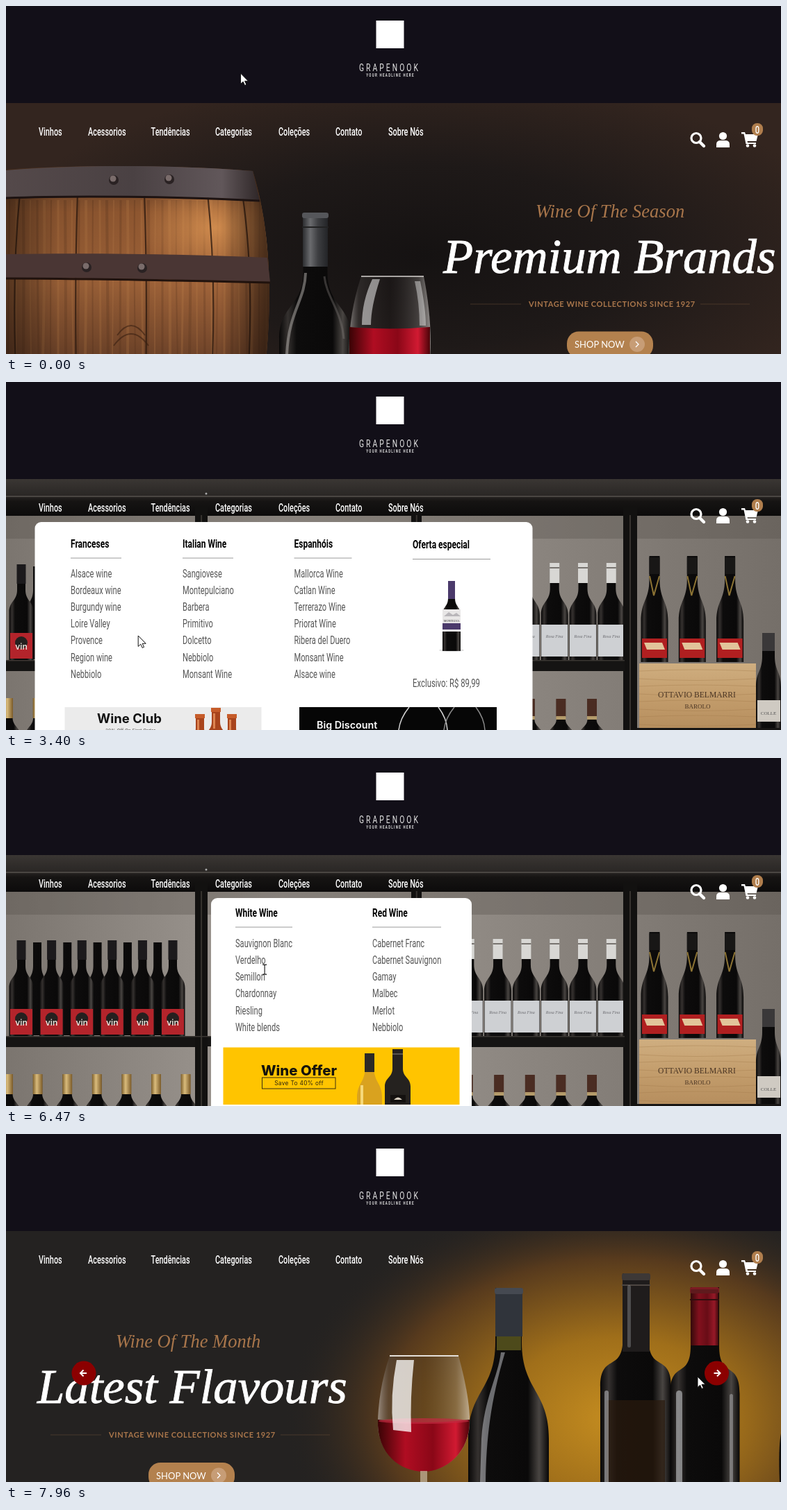
Animation, 1115 px wide and 502 px high, one loop 8 s. Source, as an HTML page:

```html
<!DOCTYPE html>
<html lang="pt">
<head>
<meta charset="utf-8">
<title>Wine shop</title>
<style>
  html, body { margin: 0; width: 100%; height: 100%; overflow: hidden; background: #120f18; }
  svg { display: block; width: 1115px; height: 502px; }
  .ui { font-family: Roboto, "Liberation Sans", sans-serif; }
  .serif { font-family: "Liberation Serif", "Noto Serif", serif; }
  .lato { font-family: Lato, "Open Sans", sans-serif; }
  .inter { font-family: Inter, "Open Sans", sans-serif; }
</style>
</head>
<body>
<svg id="stage" viewBox="0 0 1115 502" xmlns="http://www.w3.org/2000/svg"></svg>
<script>
const W = 1115, LOOP = 8000;
const stage = document.getElementById('stage');

// Markup helpers
const rect = (x, y, w, h, fill, more = '') =>
  `<rect x="${x}" y="${y}" width="${w}" height="${h}" fill="${fill}" ${more}/>`;
const path = (d, fill, more = '') => `<path d="${d}" fill="${fill}" ${more}/>`;
const stroke = (d, color, width, more = '') =>
  path(d, 'none', `stroke="${color}" stroke-width="${width}" ${more}`);
const circle = (x, y, r, fill, more = '') => `<circle cx="${x}" cy="${y}" r="${r}" fill="${fill}" ${more}/>`;
const text = (x, y, s, size, fill, cls, more = '') =>
  `<text x="${x}" y="${y}" font-size="${size}" fill="${fill}" class="${cls}" ${more}>${s}</text>`;
const narrow = (x, y, s, size, fill, more = '', k = .69) =>
  `<text transform="translate(${x} ${y}) scale(${k} 1)" font-size="${size}" fill="${fill}" class="ui" ${more}>${s}</text>`;
const row = (n, x, step, draw) => Array.from({ length: n }, (_, i) => draw(x + i * step, i)).join('');
const stops = list => list.map(([o, c, a = 1]) =>
  `<stop offset="${o}" stop-color="${c}" stop-opacity="${a}"/>`).join('');
const linear = (id, list, vertical) =>
  `<linearGradient id="${id}" x2="${vertical ? 0 : 1}" y2="${vertical ? 1 : 0}">${stops(list)}</linearGradient>`;
const radial = (id, x, y, rx, ry, list) =>
  `<radialGradient id="${id}" gradientUnits="userSpaceOnUse" cx="0" cy="0" r="1" gradientTransform="translate(${x} ${y}) scale(${rx} ${ry})">${stops(list)}</radialGradient>`;

// A bottle: n = half neck, b = half body, s1..s2 = shoulder, round = how square the shoulder is
const bottle = (x, top, end, n, b, s1, s2, fill = 'url(#dark)', round = .5) => {
  const low = s1 + (s2 - s1) * round, high = s2 - (s2 - s1) * round;
  return path(`M${x - n} ${top}H${x + n}V${s1}C${x + n} ${low} ${x + b} ${high} ${x + b} ${s2}V${end}` +
    `H${x - b}V${s2}C${x - b} ${high} ${x - n} ${low} ${x - n} ${s1}Z`, fill);
};

const defs = `<defs>
  ${linear('dark', [[0, '#080707'], [.12, '#35312f'], [.24, '#0d0c0c'], [.74, '#0a0909'], [.88, '#494542'], [1, '#080707']])}
  ${linear('olive', [[0, '#12120d'], [.2, '#3d3b2c'], [.5, '#16150f'], [.85, '#35321f'], [1, '#0c0b08']])}
  ${linear('red', [[0, '#8f1420'], [.4, '#e0394a'], [1, '#8a1019']])}
  ${linear('wineRed', [[0, '#3a0305'], [.3, '#b00d22'], [.6, '#8a0717'], [.85, '#d11a32'], [1, '#4a0308']])}
  ${linear('gold', [[0, '#7d5f2b'], [.4, '#d9bb7c'], [1, '#7a5a28']])}
  ${linear('steel', [[0, '#2c2d30'], [.3, '#6a6b6e'], [.6, '#3e3f42'], [1, '#232427']])}
  ${linear('wood', [[0, '#5d3b24'], [.25, '#945a32'], [.6, '#a2653a'], [1, '#6b4128']], true)}
  ${linear('hoop', [[0, '#54494a'], [.5, '#4a4143'], [.85, '#61575a'], [1, '#2f2728']])}
  ${linear('edge', [[0, '#160d08', .55], [.2, '#160d08', .1], [.8, '#160d08', 0], [1, '#160d08', .75]])}
  ${linear('wall', [[0, '#7b756f'], [.35, '#a19b95'], [1, '#756f69']])}
  ${linear('beam', [[0, '#3a3633'], [.45, '#2a2725'], [.6, '#161413'], [1, '#0c0b0b']], true)}
  ${linear('crate', [[0, '#cfae80'], [.5, '#c39d6c'], [1, '#b68e5e']], true)}
  ${linear('clear', [[0, '#d9d5d2', .55], [.12, '#6b6663', .25], [.5, '#2a2524', .15], [.85, '#8f8a87', .35], [1, '#e2dedb', .6]])}
  ${radial('room', 600, 360, 620, 260, [[0, '#151212'], [.5, '#1e1918'], [1, '#33251f']])}
  ${radial('warm', 300, 320, 110, 70, [[0, '#e29a56', .75], [1, '#e29a56', 0]])}
  ${radial('glow', 880, 410, 480, 330, [[0, '#c58d20'], [.35, '#a06f1a'], [.7, '#573a1d'], [1, '#242221', 0]])}
  <clipPath id="cask"><path d="M0 236C110 228 260 230 355 238C374 300 386 390 374 510H0Z"/></clipPath>
</defs>`;

function heroText(x, y, script, title, titleX, tag, tagX, tagY, btnX, btnY) {
  const tan = '#a9764b', spaced = 'font-weight="700" letter-spacing=".62"';
  const rule = (a, b) => stroke(`M${a} ${tagY - 4}H${b}`, '#6b4c36', 1, 'opacity=".5"');
  return text(x, y, script, 26.5, tan, 'serif', 'font-style="italic"') +
    text(titleX, y + 80, title, 70.7, '#fff', 'serif', 'font-style="italic" stroke="#fff" stroke-width=".9"') +
    text(tagX, tagY, tag, 11, tan, 'lato', spaced) +
    rule(tagX - 84, tagX - 11) + rule(tagX + 247, tagX + 318) +
    rect(btnX, btnY, 124, 38, '#b3814e', 'rx="17"') +
    text(btnX + 11, btnY + 23.5, 'SHOP NOW', 13, '#fff', 'lato') +
    circle(btnX + 101, btnY + 18.5, 11, '#c79d76') +
    stroke(`M${btnX + 99} ${btnY + 14.5}l4 4l-4 4`, '#fff', 1.3);
}

const TAG = 'VINTAGE WINE COLLECTIONS SINCE 1927';

function barrelSlide() {
  const seams = [20, 103, 199, 290, 340].map(x => {
    const lean = (x - 150) / 12;
    return stroke(`M${x} 270Q${x + lean} 380 ${x + lean * .6} 510`, '#2f1b10', 2.2, 'opacity=".8"');
  }).join('');
  const grain = row(38, 5, 10, (x, i) =>
    stroke(`M${x} 280q${i % 3 - 1} 110 ${i % 5 - 2} 225`, i % 2 ? '#c98a50' : '#4a2b18', 2 + i % 3, 'opacity=".22"'));
  const rivets = [[155, 250], [235, 249], [116, 376], [196, 377]].map(([x, y]) =>
    circle(x, y + 1, 7, '#2a2223') + circle(x - 1, y - 1, 4.5, '#7a6c6b')).join('');
  const glass = 'M511 390C498 430 492 470 494 510H610C613 470 608 425 601 390Z';
  return rect(0, 140, W, 362, 'url(#room)') +
    `<g clip-path="url(#cask)">${rect(0, 225, 390, 290, 'url(#wood)')}${grain}${rect(180, 240, 210, 160, 'url(#warm)')}${seams}` +
    stroke('M160 475q20 -28 40 0M155 490q25 -34 50 0', '#3b2112', 2, 'opacity=".6"') +
    rect(0, 225, 385, 290, 'url(#edge)') + '</g>' +
    path('M0 237C110 228 260 230 355 238L365 280C250 274 100 272 0 276Z', 'url(#hoop)') +
    stroke('M0 277C100 273 250 275 365 281', '#1d1312', 3) +
    path('M0 358C120 356 260 358 376 363L380 398C250 395 120 392 0 392Z', '#4a3634') +
    stroke('M0 393C120 393 250 396 380 399', '#20120d', 3) + rivets +
    bottle(445, 298, 510, 17.5, 52, 385, 480) +
    rect(427, 300, 36, 76, 'url(#steel)') + rect(426, 298, 38, 8, '#55565a', 'rx="3"') + rect(426, 318, 38, 2, '#222') +
    stroke('M431 385C430 425 407 440 404 502', '#b9b5b2', 4, 'opacity=".5"') +
    stroke('M458 390C461 420 483 440 486 480', '#7c7774', 3, 'opacity=".4"') +
    path(glass, 'url(#clear)') +
    path('M494 463Q552 468 610 463V510H494Z', 'url(#wineRed)') +
    path('M527 394h11q-13 40 -13 66h-13q0 -34 15 -66', '#fff', 'opacity=".5"') +
    path('M588 397h8q8 40 8 64h-9q0 -32 -7 -64', '#fff', 'opacity=".4"') +
    stroke('M511 390H601', '#d9d5d2', 1.6) +
    heroText(762, 305, 'Wine Of The Season', 'Premium Brands', 629, TAG, 752, 434, 807, 469.5);
}

function shelfSlide() {
  const post = (x, w) => rect(x, 180, w, 322, '#121110') + rect(x + w * .45, 192, 2, 310, '#37332f');
  const redLabel = x => bottle(x, 263, 402, 6, 17.5, 300, 332) + rect(x - 6.5, 263, 13, 28, '#1c1a1c') +
    rect(x - 16, 362, 32, 37, '#b3242b') + circle(x, 376, 9, '#25201f') +
    text(x, 386, 'vin', 12, '#e8dfd8', 'inter', 'text-anchor="middle" font-weight="600"');
  const whiteLabel = x => bottle(x, 263, 400, 6.5, 19.5, 300, 340, 'url(#olive)') + rect(x - 7, 262, 14, 31, 'url(#red)') +
    rect(x - 19, 358, 38, 41, '#dcd8d0') + circle(x - 5, 374, 7, '#b9b4ac') + rect(x - 11, 388, 22, 1, '#a39d95');
  const whiteCap = x => bottle(x, 262, 401, 6.5, 19.5, 298, 336) + rect(x - 7, 261, 14, 29, '#d8d7d4') +
    rect(x - 7, 267, 14, 2, '#77736f') + rect(x - 19, 350, 38, 46, '#ced0d3') +
    text(x, 369, 'Rosa Fina', 6, '#6d6d72', 'serif', 'text-anchor="middle" font-style="italic"');
  const sparkling = x => bottle(x, 251, 404, 7.5, 19.5, 285, 345) + rect(x - 7.5, 253, 15, 24, '#181716') +
    stroke(`M${x - 7} 280l6 28l8 -28`, '#8d7434', 2) +
    rect(x - 18, 370, 36, 28, '#b01f20') + path(`M${x - 15} 376h26l4 10h-26z`, '#e2c49a');
  const striped = x => bottle(x, 444, 510, 7, 20, 470, 500) +
    row(5, 444, 7, y => rect(x - 7, y, 14, 3.5, '#eee'));
  return rect(0, 140, W, 362, 'url(#wall)') +
    rect(0, 192, W, 34, '#56514c', 'opacity=".35"') +
    rect(0, 140, W, 53, 'url(#beam)') + rect(0, 164, W, 2, '#4a4642') + circle(288, 161, 1.5, '#aaa') +
    row(5, 45, 43.3, x => bottle(x, 266, 400, 6, 16, 300, 335)) + row(6, 22, 43.6, redLabel) +
    row(5, 347, 48.5, x => bottle(x, 267, 400, 6.5, 18, 300, 340, 'url(#olive)') + rect(x - 7, 266, 14, 28, 'url(#red)')) +
    row(6, 326, 47.2, whiteLabel) + row(7, 626, 40.8, whiteCap) +
    row(7, 3, 42.6, x => bottle(x, 457, 510, 6.5, 17, 484, 510) + rect(x - 7, 456, 14, 29, 'url(#gold)')) +
    row(3, 444, 38.5, striped) +
    row(6, 620, 44.6, x => bottle(x, 458, 510, 6.5, 18, 486, 510) + rect(x - 7, 457, 14, 26, '#4a2c22') + rect(x - 7, 482, 14, 5, '#b39a6a')) +
    post(272, 18) + post(583, 15) + post(888, 20) +
    rect(0, 402, 272, 15, '#151413') + rect(290, 401, 294, 15, '#151413') + rect(598, 402, 292, 15, '#151413') +
    rect(0, 401, 890, 1.5, '#3b3733') +
    row(3, 933, 54.3, sparkling) +
    rect(911, 406, 168, 94, 'url(#crate)') +
    row(8, 417, 11, (y, i) => stroke(`M911 ${y}q80 ${i % 2 ? 5 : -4} 168 0`, '#a37b4d', 1, 'opacity=".4"')) +
    text(994, 455, 'OTTAVIO BELMARRI', 11.6, '#4a3524', 'serif', 'text-anchor="middle"') +
    text(995, 471, 'BAROLO', 9, '#4a3524', 'serif', 'text-anchor="middle"') +
    bottle(1097, 362, 502, 9, 18, 395, 440) + rect(1088, 362, 18, 26, '#3a3839') +
    rect(1081, 459, 33, 31, '#cfcac2') + text(1097, 480, 'COLLE', 7, '#555', 'serif', 'text-anchor="middle"') +
    rect(908, 499, 207, 3, '#171514');
}

function flavourSlide() {
  const shine = (x, y, w, h, a) => rect(x, y, w, h, '#dfe3e8', `rx="${w / 2}" opacity="${a}"`);
  return rect(0, 140, W, 362, '#242221') + rect(390, 140, 725, 362, 'url(#glow)') +
    bottle(723, 222, 510, 19, 58, 300, 440) + rect(704, 224, 39, 68, '#30343b') +
    rect(703, 222, 41, 9, '#454951', 'rx="3"') + rect(706, 292, 35, 20, '#4d4a1b') +
    path('M712 315C708 350 688 380 684 440L682 502H690C691 440 697 385 718 315Z', '#dfe3e8', 'opacity=".45"') +
    bottle(906, 201, 510, 18.5, 51, 295, 365, 'url(#dark)', .72) + rect(887, 202, 39, 112, '#1f1c1c') +
    rect(886, 201, 41, 10, '#3d3836', 'rx="3"') + rect(886, 217, 41, 2, '#4d4642') +
    rect(864, 384, 84, 118, '#2a1a0d', 'opacity=".7"') + shine(861, 370, 6, 140, .45) + shine(894, 218, 5, 90, .25) +
    bottle(1005.5, 221, 510, 20.5, 50, 305, 375, 'url(#dark)', .72) + rect(985, 224, 40, 81, 'url(#wineRed)') +
    rect(984, 221, 42, 9, '#7c1b22', 'rx="3"') + rect(984, 238, 42, 2, '#35070b') + rect(985, 224, 40, 81, '#2a1716', 'opacity=".35"') +
    shine(964, 370, 9, 140, .5) + shine(1041, 375, 5, 130, .35) +
    path('M1115 432q-4 20 -2 70h2z', '#0d0b0a') +
    path('M552 320H651C662 360 668 395 667 420C664 462 632 487 601 487C568 487 536 460 535 420C535 390 540 355 552 320Z', 'url(#clear)') +
    path('M535 412Q601 420 667 412C668 460 632 487 601 487C568 487 533 462 535 412Z', 'url(#wineRed)') +
    `<ellipse cx="601" cy="414" rx="65" ry="4" fill="#c22a40" opacity=".7"/>` +
    path('M562 326h25q-6 55 -4 104l-26 -3q-5 -50 5 -101', '#fff', 'opacity=".75"') +
    rect(596, 486, 10, 20, '#c9b9a0', 'opacity=".7"') +
    stroke('M552 320H651', '#e5e0da', 1.8) +
    heroText(158, 308, 'Wine Of The Month', 'Latest Flavours', 45, TAG, 148, 438, 205, 474);
}

const slides = [barrelSlide(), shelfSlide(), flavourSlide()]
  .map((s, i) => `<svg x="${i * W}" y="0" width="${W}" height="502">${s}</svg>`).join('');

// Drop-down menus
const links = [];
function column(menu, x, y, lineW, title, first, step, items) {
  return narrow(x, y, title, 16, '#000', 'font-weight="700"', .75) +
    rect(x, y + 15, lineW, 1, '#9a9a9a') +
    items.map((s, i) => {
      const ly = first + i * step;
      links.push({ menu, x, y: ly - 5, w: lineW });
      return narrow(x, ly, s, 16, '#555', 'data-link=""', .695);
    }).join('');
}

const countries = rect(41.5, 202, 716, 330, '#fff', 'rx="9"') +
  column(0, 93, 238.5, 73, 'Franceses', 282, 24.1, ['Alsace wine', 'Bordeaux wine', 'Burgundy wine', 'Loire Valley', 'Provence', 'Region wine', 'Nebbiolo']) +
  column(0, 254, 238.5, 73, 'Italian Wine', 282, 24.1, ['Sangiovese', 'Montepulciano', 'Barbera', 'Primitivo', 'Dolcetto', 'Nebbiolo', 'Monsant Wine']) +
  column(0, 414.5, 238.5, 83, 'Espanhóis', 282, 24.1, ['Mallorca Wine', 'Catlan Wine', 'Terrerazo Wine', 'Priorat Wine', 'Ribera del Duero', 'Monsant Wine', 'Alsace wine']) +
  column(0, 585, 240, 112, 'Oferta especial', 0, 0, []) +
  narrow(585, 440, 'Exclusivo: R$ 89,99', 16, '#555', '', .71) +
  `<ellipse cx="641" cy="387" rx="18" ry="2" fill="#ddd"/>` +
  bottle(641, 287, 388, 5, 13, 312, 336) + rect(636, 287, 10, 26, '#4b3a6b') +
  rect(628, 328, 26, 32, '#e8e6e6') + path('M630 338l7 -6l6 4l5 -3l6 5z', '#b9b6ba') +
  text(641, 346, 'MONTELVA', 4.2, '#333', 'serif', 'text-anchor="middle"') + rect(628, 348, 26, 9, '#4b3a6b') +
  rect(84.5, 469, 283, 40, '#ebebeb') +
  text(131, 491.5, 'Wine Club', 18.5, '#111', 'inter', 'font-weight="700"') +
  text(143, 505, '20% Off On First Order', 6.6, '#555', 'inter') +
  [[279, 479], [325, 479], [302, 470]].map(([x, y]) =>
    bottle(x, y, 510, 6, 15, y + 20, y + 45, '#a8441c') + rect(x - 7, y, 14, 6, '#c65c2a') + rect(x - 4, y + 8, 3, 22, '#dd8450')).join('') +
  rect(422, 469, 284, 40, '#060606') +
  text(447, 500, 'Big Discount', 14.3, '#fff', 'inter', 'font-weight="600"') +
  stroke('M580 469Q567 485 565 502M622 469Q634 485 635 502', '#d5d5d5', 1.5) +
  stroke('M645 469Q632 485 630 502M676 469Q688 485 689 502', '#8a8a8a', 1.5);

const types = rect(295, 202, 375, 330, '#fff', 'rx="9"') +
  column(1, 330, 228.5, 82, 'White Wine', 272.5, 24.3, ['Sauvignon Blanc', 'Verdelho', 'Semillon', 'Chardonnay', 'Riesling', 'White blends']) +
  column(1, 527, 228.5, 99, 'Red Wine', 272.5, 24.3, ['Cabernet Franc', 'Cabernet Sauvignon', 'Gamay', 'Malbec', 'Merlot', 'Nebbiolo']) +
  rect(312.5, 417.5, 340, 82.5, '#ffc400') +
  text(367, 458, 'Wine Offer', 20.4, '#15130c', 'inter', 'font-weight="800"') +
  rect(368.5, 461, 105.5, 16, 'none', 'stroke="#3a3010"') +
  text(421.5, 472, 'Save To 40% off', 8.3, '#2a240e', 'inter', 'text-anchor="middle" letter-spacing=".35"') +
  bottle(523, 426, 500, 6.5, 18, 447, 490, '#d9a21f') + rect(516, 426, 14, 27, '#2c2a26') + rect(510, 472, 4, 28, '#f6d879') +
  bottle(563.5, 420, 500, 7.5, 18.5, 448, 474, '#25221f') + rect(556, 426, 15, 2, '#5a5550') +
  rect(553, 486, 22, 11, '#14110f') + path('M558 493q6 -7 12 0z', '#d8cfc0');

const nav = [[47, 'Vinhos'], [118, 'Acessorios'], [208.5, 'Tendências'], [301, 'Categorias'], [392, 'Coleções'], [474, 'Contato'], [550, 'Sobre Nós']]
  .map(([x, s]) => narrow(x, 187, s, 16, '#fff', 'font-weight="500"', .68)).join('');

const header = rect(0, 0, W, 139.5, '#120f18') +
  rect(532.5, 21, 40, 40, '#fff') +
  narrow(552, 94, 'GRAPENOOK', 15, '#e6e6e6', 'text-anchor="middle" letter-spacing="4.4"') +
  narrow(553, 102, 'YOUR HEADLINE HERE', 6.5, '#ddd', 'text-anchor="middle" letter-spacing="1.9" font-weight="700"');

const icons = stroke('M998 196L1004 202', '#fff', 4.4, 'stroke-linecap="round"') +
  circle(993, 190.5, 7, 'none', 'stroke="#fff" stroke-width="3.2"') +
  circle(1031.5, 187.5, 5.6, '#fff') +
  path('M1022 204V199.5Q1022 194 1028 194H1035Q1041 194 1041 199.5V204Z', '#fff') +
  path('M1058 182H1063L1064 185H1082L1079.5 195H1066.5L1067 197H1079V199H1064.5L1061.5 184.5H1058Z', '#fff') +
  circle(1067, 201.5, 2.3, '#fff') + circle(1077, 201.5, 2.3, '#fff') +
  rect(1073, 169, 16, 18, '#b07e4d', 'rx="7.5"') +
  narrow(1081, 183.5, '0', 14, '#fff', 'text-anchor="middle" font-weight="500"', .8);

const arrow = (x, dir) => circle(x, 345, 17.5, '#8b0000') +
  stroke(`M${x - 4 * dir} 345h${8.5 * dir}M${x + .5 * dir} 340.5l${4.5 * dir} 4.5l${-4.5 * dir} 4.5`, '#fff', 2);

stage.innerHTML = defs + `<g id="strip">${slides}</g>` + header + nav + icons +
  `<g id="menu0">${countries}</g><g id="menu1">${types}</g>` +
  `<g id="arrows">${arrow(112, -1)}${arrow(1022.5, 1)}</g>` +
  `<g id="pointer">${path('M0 0V15.5L3.6 12.2L6 17.5L8.4 16.4L6 11.3H11Z', '#fff', 'stroke="#111" stroke-width="1"')}</g>` +
  `<g id="beamCursor">${stroke('M-3 -7H-.8L0 -6.2L.8 -7H3M0 -6.5V6.5M-3 7H-.8L0 6.2L.8 7H3', '#111', 1.1)}</g>`;

const $ = id => document.getElementById(id);
const [strip, arrows, pointer, beamCursor] = ['strip', 'arrows', 'pointer', 'beamCursor'].map($);
const menus = [$('menu0'), $('menu1')];
const linkNodes = stage.querySelectorAll('[data-link]');

// Cursor path: time, x, y
const track = [
  [0, 338, 97], [70, 307, 100], [390, 222, 103], [620, 219, 100], [950, 155, 56], [1390, 103, 103],
  [1700, 68, 178], [1900, 76, 196], [2240, 113, 266], [2500, 119.5, 280], [2750, 119.5, 280],
  [3090, 125, 325], [3400, 190, 366], [3600, 225, 360], [3930, 287, 330], [4300, 282, 270],
  [4780, 246, 206], [5000, 240, 185], [5320, 354, 170], [5700, 346, 172], [6000, 352, 215],
  [6470, 372, 305], [6700, 400, 330], [7100, 660, 384], [7400, 800, 405], [7650, 925, 392], [7960, 995, 350], [LOOP, 995, 350]
];

function cursorAt(t) {
  const i = track.findIndex((k, n) => n && t <= k[0]);
  const [t0, x0, y0] = track[i - 1], [t1, x1, y1] = track[i];
  const p = (t - t0) / (t1 - t0);
  return [x0 + (x1 - x0) * p, y0 + (y1 - y0) * p];
}

// cubic-bezier(.25, .1, .25, 1)
function ease(p) {
  if (p <= 0) return 0;
  if (p >= 1) return 1;
  const bez = (a, b, u) => 3 * a * u * (1 - u) ** 2 + 3 * b * u * u * (1 - u) + u ** 3;
  let lo = 0, hi = 1;
  for (let i = 0; i < 24; i++) {
    const mid = (lo + hi) / 2;
    if (bez(.25, .25, mid) < p) lo = mid; else hi = mid;
  }
  return bez(.1, 1, lo);
}

const show = (node, on) => node.setAttribute('visibility', on ? 'visible' : 'hidden');
const open = [[1720, 4700], [5390, 7200]];

function draw(t) {
  const shift = W * (ease((t - 2598) / 480) + ease((t - 6598) / 480));
  strip.setAttribute('transform', `translate(${-shift} 0)`);

  const active = open.findIndex(([a, b]) => t >= a && t < b);
  menus.forEach((m, i) => show(m, i === active));
  show(arrows, t >= 7420);

  const [x, y] = cursorAt(t);
  let overText = false;
  links.forEach((l, i) => {
    const inside = l.menu === active && x >= l.x && x <= l.x + l.w;
    const dy = Math.abs(y - l.y);
    if (inside && dy < 13) overText = true;
    linkNodes[i].setAttribute('fill', inside && dy < 9 ? '#000' : '#555');
  });
  show(pointer, !overText);
  show(beamCursor, overText);
  for (const c of [pointer, beamCursor]) c.setAttribute('transform', `translate(${x} ${y})`);
}

function tick() {
  draw(performance.now() % LOOP);
  requestAnimationFrame(tick);
}
tick();
</script>
</body>
</html>
```
